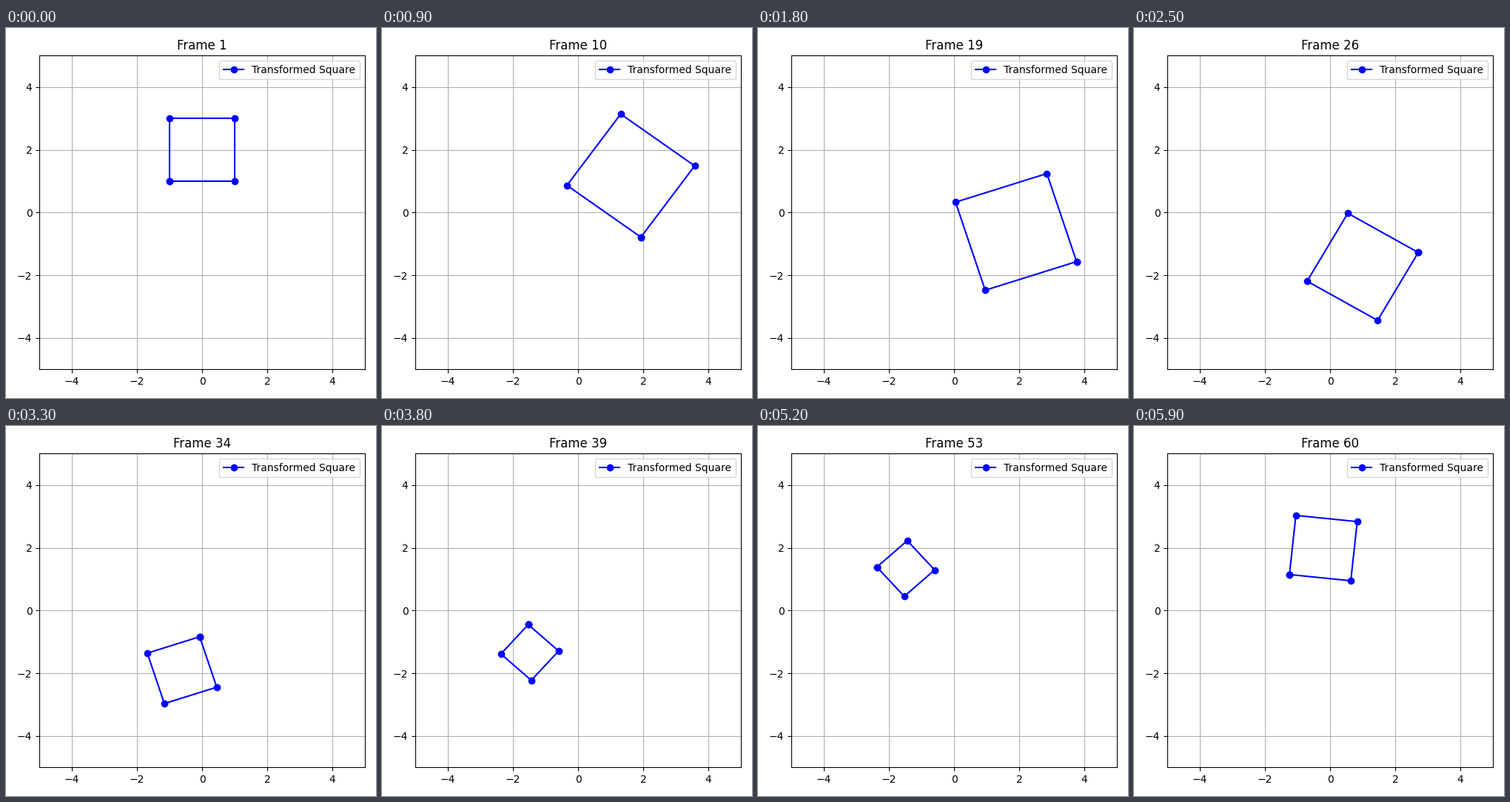
A matplotlib script for the animation above (6 s loop, 500x500 px).

```python
import numpy as np
import matplotlib.pyplot as plt
from matplotlib.animation import FuncAnimation

FRAMES = 60
INTERVAL = 100
SQUARE = np.array([[-1, -1], [1, -1], [1, 1], [-1, 1], [-1, -1]], dtype=float)


def transformed_square(angle):
    """Scale, rotate and move the square along a circle of radius 2."""
    c, s = np.cos(angle), np.sin(angle)
    rotation = np.array([[c, -s], [s, c]])
    scale = 1 + 0.5 * s
    return scale * SQUARE @ rotation.T + [2 * s, 2 * c]


fig, ax = plt.subplots(figsize=(5, 5), dpi=100)
line, = ax.plot([], [], "bo-", label="Transformed Square")
ax.set_xlim(-5, 5)
ax.set_ylim(-5, 5)
ax.grid(True)
ax.legend(loc="upper right")
title = ax.set_title("Frame 1")
fig.tight_layout()


def update(i):
    points = transformed_square(2 * np.pi * i / FRAMES)
    line.set_data(points[:, 0], points[:, 1])
    title.set_text(f"Frame {i + 1}")
    return line, title


anim = FuncAnimation(fig, update, frames=FRAMES, interval=INTERVAL,
                     repeat=True, repeat_delay=0, blit=False)
plt.show()
```
